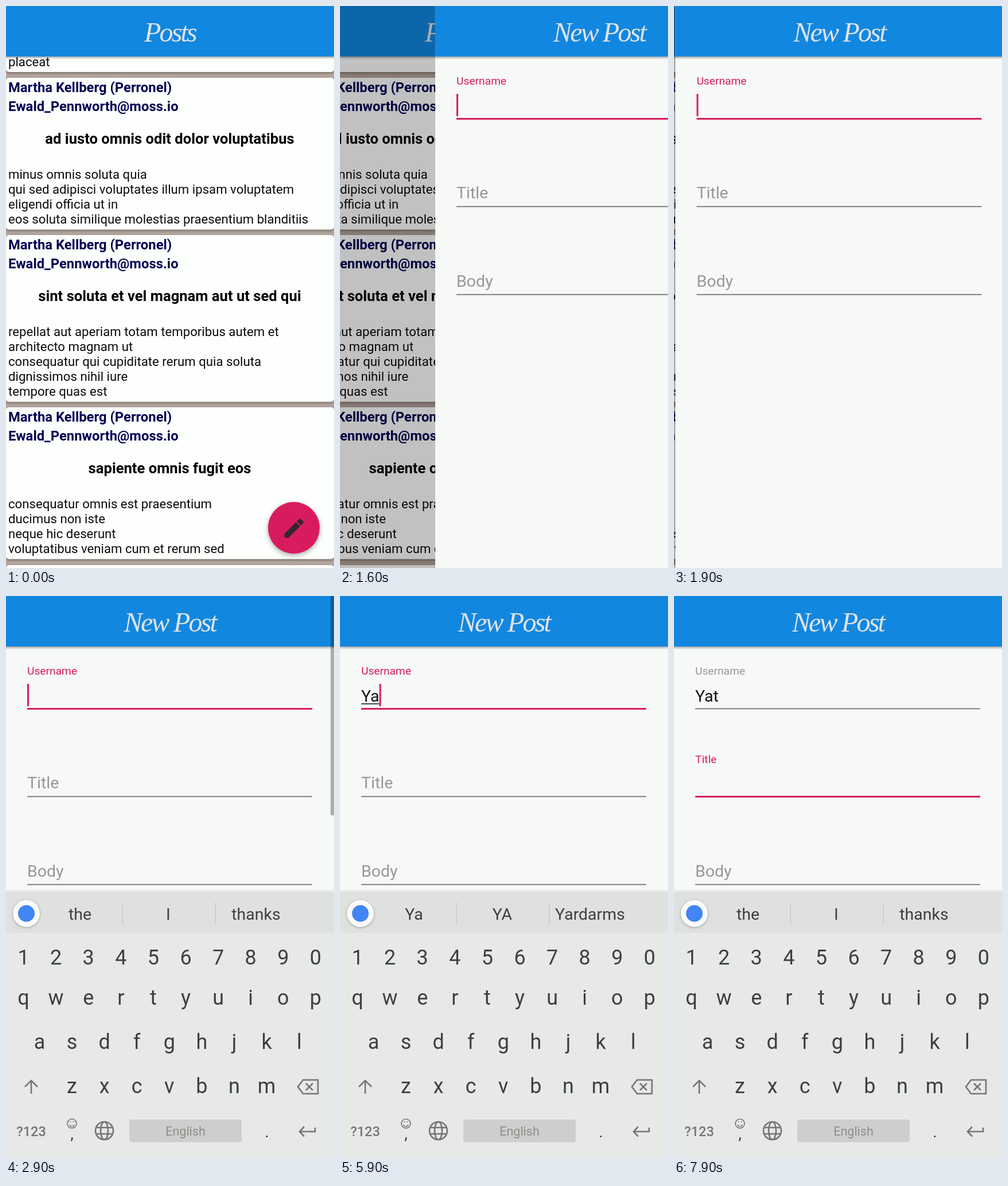
Write an HTML page that moves like this. It is 572 px wide and 979 px high and loops after 8 s.

```html
<!DOCTYPE html>
<html lang="en">
<head>
<meta charset="utf-8">
<title>New Post</title>
<style>
html, body { margin: 0; height: 100%; overflow: hidden; }
svg { display: block; width: 100vw; height: 100vh; font-family: Roboto, sans-serif; }
text { white-space: pre; }
.mid { text-anchor: middle; }
.bold { font-weight: 700; }
.medium { font-weight: 500; }
.head { font: italic 48px "Liberation Serif", serif; letter-spacing: -2.8px; fill: #dfe3e6; }
.card { fill: #fdfffd; filter: drop-shadow(0 2px 2px rgba(0,0,0,.35)); }
.raised { filter: drop-shadow(0 3px 4px rgba(0,0,0,.35)); }
.icon { fill: none; stroke: #747674; stroke-width: 2.6; }
</style>
</head>
<body>
<svg id="stage" viewBox="0 0 572 979" preserveAspectRatio="none"></svg>
<script>
const PINK = [216, 27, 96], GREY = [150, 152, 150], LINE = [112, 114, 112];
const KEY = '#3d403d';

const text = (x, y, size, str, fill = '#000', cls = '', id = '') =>
  `<text x="${x}" y="${y}" font-size="${size}" fill="${fill}" class="${cls}" id="${id}">${str}</text>`;
const rect = (x, y, w, h, fill, extra = '') =>
  `<rect x="${x}" y="${y}" width="${w}" height="${h}" fill="${fill}" ${extra}/>`;
const line = (y, id) =>
  `<line id="${id}" x1="37" x2="534" y1="${y}" y2="${y}" stroke="rgb(${LINE})" stroke-width="1.6"/>`;
const header = title =>
  rect(0, 88, 572, 5, 'url(#fade)') + rect(0, 0, 572, 88, '#1287e0') + text(286, 62, 48, title, '', 'mid head');

const posts = [
  [125, 'ad iusto omnis odit dolor voluptatibus', ['minus omnis soluta quia',
    'qui sed adipisci voluptates illum ipsam voluptatem', 'eligendi officia ut in',
    'eos soluta similique molestias praesentium blanditiis']],
  [399, 'sint soluta et vel magnam aut ut sed qui', ['repellat aut aperiam totam temporibus autem et',
    'architecto magnam ut', 'consequatur qui cupiditate rerum quia soluta',
    'dignissimos nihil iure', 'tempore quas est']],
  [699, 'sapiente omnis fugit eos', ['consequatur omnis est praesentium', 'ducimus non iste',
    'neque hic deserunt', 'voluptatibus veniam cum et rerum sed']]
];
const card = (y, h) => rect(0, y, 572, h, '#fdfffd', 'rx="5" class="card"');
const post = ([y, title, body]) => card(y, 160 + 26 * body.length + 0.5) +
  text(4, y + 25, 23.8, 'Martha Kellberg (Perronel)', '#000052', 'bold') +
  text(4, y + 57.5, 23.8, 'Ewald_Pennworth@moss.io', '#000052', 'bold') +
  text(285.5, y + 115, 25.6, title, '#000', 'bold mid') +
  body.map((s, i) => text(4, y + 176 + 26 * i, 22.2, s, '#0c0c0c')).join('');

const feed = rect(0, 0, 572, 979, '#b3a69e') + card(60, 55) + text(4, 104.5, 22.2, 'placeat', '#0c0c0c') +
  posts.map(post).join('') + card(974, 60) + header('Posts') +
  `<circle cx="502" cy="909" r="45" fill="#d81b5f" class="raised"/>
  <path transform="translate(501.500 910.500) rotate(-45)" fill="#33272c"
    d="M-22 0L-18-5H11V5H-18ZM13-5H18Q21-5 21-2V2Q21 5 18 5H13Z"/>`;

const form = rect(0, 0, 572, 979, '#f7f9f6') + header('New Post') +
  text(37, 137.3, 19.2, 'Username', '', '', 'userLabel') + line(196.4, 'userLine') +
  text(37, 184, 28.5, '', '#151515', '', 'typed') + rect(37, 187, 0, 1.6, '#222', 'id="underline"') +
  text(37, 335, 28.5, 'Title', '', '', 'titleLabel') + line(349.4, 'titleLine') +
  text(37, 488.5, 28.5, 'Body', '#969896') + line(502.6, 'bodyLine') +
  rect(37, 153, 3, 39, `rgb(${PINK})`, 'id="caret"');

// Key rows: characters, first centre, baseline
const rows = [['1234567890', 30.5, 642], ['qwertyuiop', 30.5, 712], ['asdfghjkl', 58.5, 788.5], ['zxcvbnm', 115, 865.5]];
const keys = rows.map(([chars, x, y]) =>
  [...chars].map((c, i) => text(x + 56.6 * i, y, 36, c, KEY, 'mid')).join('')).join('');

const board = rect(0, 512, 572, 4, '#000', 'opacity=".04"') + rect(0, 515, 572, 464, '#e7e9e6') +
  rect(0, 515, 572, 72, '#dfe1de') + rect(202.3, 534, 1.4, 38, '#c6c8c5') + rect(364.3, 534, 1.4, 38, '#c6c8c5') +
  `<circle cx="35.500" cy="553" r="23.500" fill="#f9faf9" style="filter:drop-shadow(0 1px 2px rgba(0,0,0,.3))"/>
  <circle cx="35.500" cy="553" r="14.500" fill="#4285f4"/>` +
  [129, 283, 436].map((x, i) => text(x, 563.5, 28.5, '', KEY, 'mid', 'hint' + i)).join('') +
  rect(6, 823, 76, 64, '#cfd1ce', 'rx="5" id="shiftPress"') + `<g id="keys">${keys}</g>` +
  `<g class="icon">
    <path id="arrow" d="M44 867V844M33 855L44 844L55 855"/>
    <path d="M518 843H544V867H518L509 855ZM523 849L535 861M535 849L523 861"/>
    <circle cx="115" cy="919" r="8" stroke-width="1.6"/>
    <path stroke-width="1.6" d="M110.500 921Q115 927 119.500 921M111.500 916H113.500M116.500 916H118.500"/>
    <circle cx="171.500" cy="931.500" r="15.500"/>
    <ellipse cx="171.500" cy="931.500" rx="6.500" ry="15.500"/>
    <path d="M157 926H186M157 937H186M539 926V933H512M520 924.500L512 933L520 941.500"/>
  </g>` +
  text(44, 940.5, 23.5, '?123', '#747674', 'mid medium') + text(115, 946, 28, ',', KEY, 'mid') +
  rect(215, 912, 196, 39.5, '#cdcfcc', 'rx="4"') + text(313, 939.5, 21.5, 'English', '#8d8f8d', 'mid') +
  text(455, 943, 28, '.', KEY, 'mid') +
  `<g id="popup" class="raised">${rect(-30, -105, 60, 143, '#f8f9f8', 'rx="6"')}${text(0, -57, 40, '', KEY, 'mid', 'popChar')}</g>`;

const el = id => document.getElementById(id);
el('stage').innerHTML = `<defs><linearGradient id="fade" x2="0" y2="1">
  <stop stop-color="#000" stop-opacity=".32"/><stop offset="1" stop-color="#000" stop-opacity="0"/></linearGradient></defs>
  <g id="feed">${feed}</g>${rect(0, 0, 572, 979, '#000', 'id="dim"')}
  <g id="form">${form}</g>${rect(566, 0, 6, 382, '#000', 'id="scrollbar"')}<g id="board">${board}</g>`;

const clamp = v => Math.max(0, Math.min(1, v));
const ramp = (t, from, to) => clamp((t - from) / (to - from));
const mix = (a, b, p) => a + (b - a) * p;
const blend = (a, b, p) => `rgb(${a.map((v, i) => Math.round(mix(v, b[i], p)))})`;
const set = (id, attrs) => { for (const k in attrs) el(id).setAttribute(k, attrs[k]); };
const latest = (list, t) => list.filter(s => s[0] <= t).pop();

const typing = [[0, ''], [5600, 'Y'], [5900, 'Ya'], [6100, 'Yat']];
const hints = [[0, 'the', 'I', 'thanks'], [5600, 'Y', 'You', 'Yes'], [5900, 'Ya', 'YA', 'Yardarms'],
  [6100, 'Yat', 'Yet', 'Yardarms'], [7400, 'the', 'I', 'thanks']];
// Presses last 100 ms: time, character, key centre
const presses = [[5500, 'Y', 313.5, 700], [5800, 'a', 58.5, 777], [6000, 't', 256.9, 700]];

function caretOn(t) {
  if (t < 5500) return t < 1600 || (t + 900) % 1000 >= 500;
  return t < 6500 || t >= 7000 && t < 7900;
}

function draw(t) {
  const slide = 1 - (1 - ramp(t, 1400, 2000)) ** 3.05;
  set('feed', { transform: `translate(${-131 * slide})` });
  set('dim', { opacity: 0.34 * slide });
  set('form', { transform: `translate(${572 * (1 - slide)})` });
  const rise = 1 - (1 - ramp(t, 2100, 2500)) ** 3;
  set('board', { transform: `translate(0 ${470 * (1 - rise)})` });
  set('scrollbar', { opacity: t < 2500 ? 0 : 0.3 * (1 - ramp(t, 2900, 3600)) });

  const focus = ramp(t, 7300, 7600), moved = t >= 7400;
  set('userLabel', { fill: blend(PINK, GREY, focus) });
  set('userLine', { stroke: blend(PINK, LINE, focus), 'stroke-width': mix(3, 1.6, focus) });
  set('titleLabel', { fill: blend(GREY, PINK, focus), y: mix(335, 290.7, focus), 'font-size': mix(28.5, 19.2, focus) });
  set('titleLine', { stroke: blend(LINE, PINK, focus), 'stroke-width': mix(1.6, 3, focus) });

  const word = latest(typing, t)[1];
  el('typed').textContent = word;
  const width = word ? el('typed').getComputedTextLength() : 0;
  set('underline', { width: moved ? 0 : width });
  set('caret', { x: 37 + (moved ? 0 : width), y: moved ? 306 : 153, opacity: +caretOn(t) });
  latest(hints, t).slice(1).forEach((s, i) => el('hint' + i).textContent = s);

  const shifted = t >= 5000 && t < 5600;
  el('keys').style.textTransform = shifted ? 'uppercase' : 'none';
  set('arrow', { stroke: shifted ? '#1287e0' : '#747674' });
  set('shiftPress', { opacity: +(t >= 4900 && t < 5100) });
  const press = presses.find(p => t >= p[0] && t < p[0] + 100);
  set('popup', { opacity: press ? 1 : 0, transform: press ? `translate(${press[2]} ${press[3]})` : '' });
  el('popChar').textContent = press ? press[1] : '';
}

function tick() {
  draw(Math.floor(performance.now() % 8000 / 100) * 100);
  requestAnimationFrame(tick);
}
tick();
</script>
</body>
</html>
```
